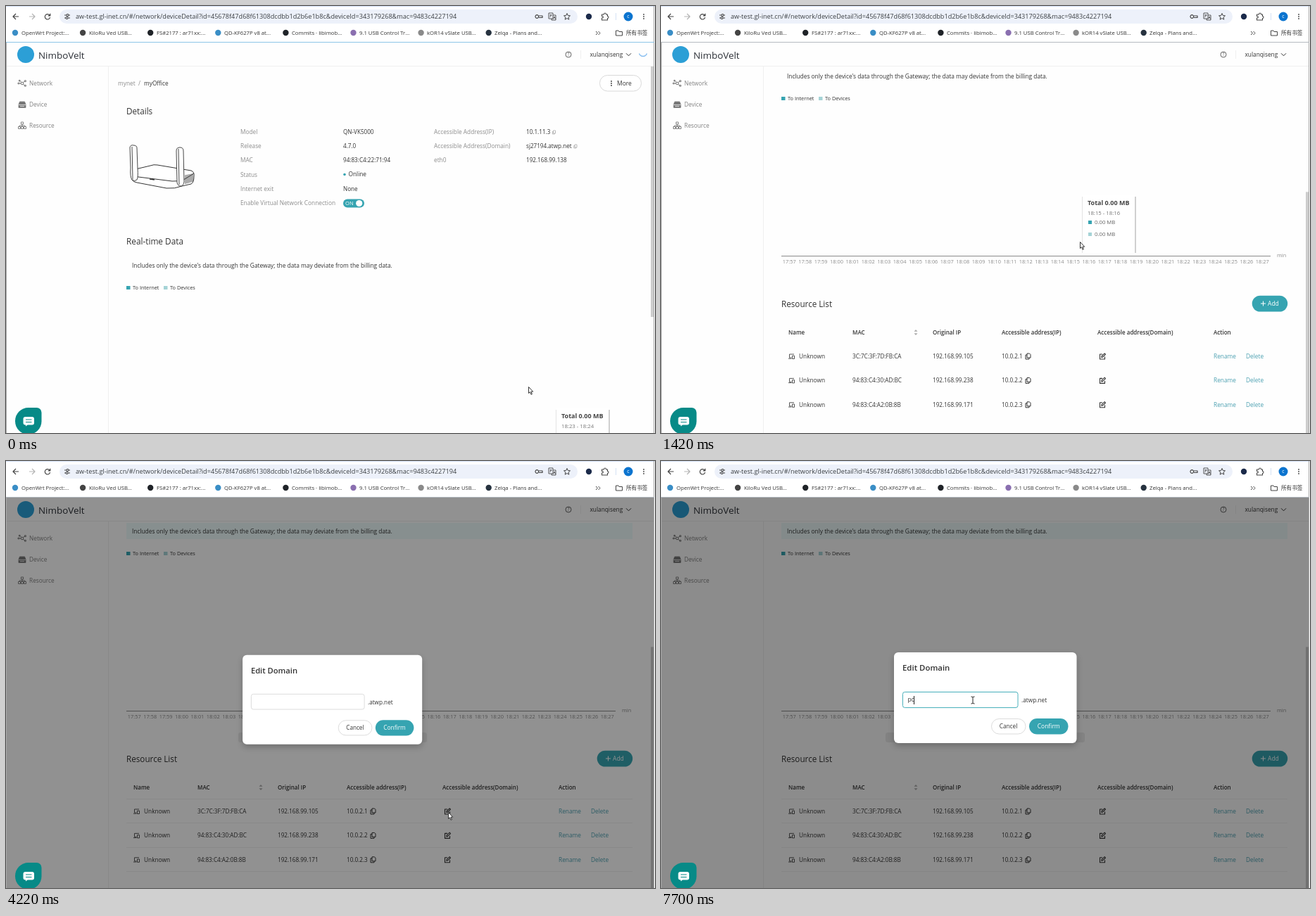
These frames come from a looping animation (922x607 px, 8000 ms). An HTML page with a canvas:

```html
<!DOCTYPE html>
<html lang="en">
<head>
<meta charset="utf-8">
<title>Device detail</title>
<style>
  html, body { margin: 0; width: 100%; height: 100%; overflow: hidden; background: #fff; }
  canvas { display: block; width: 922px; height: 607px; }
</style>
</head>
<body>
<canvas id="stage" width="922" height="607"></canvas>
<script>
const ctx = document.getElementById('stage').getContext('2d');
const LOOP = 8000;
const TEAL = '#36a4b1', INK = '#333', GREY = '#8c8c8c', FAINT = '#efefef';
const SANS = '"Open Sans", "Noto Sans", "Noto Sans CJK SC", sans-serif';

// Each entry holds from its time until the next one.
const CURSOR = [
  [0, 742, 541, 'arrow'], [150, 748, 539, 'arrow'], [280, 753, 536, 'arrow'],
  [430, 595, 335, 'arrow'], [1560, 640, 453, 'arrow'], [1720, 638, 491, 'arrow'],
  [1860, 634, 498, 'arrow'], [2010, 629, 500, 'hand'], [4070, 628, 499, 'arrow'],
  [4680, 618, 494, 'arrow'], [4960, 580, 480, 'arrow'], [5100, 510, 410, 'arrow'],
  [5230, 449, 353, 'arrow'], [5380, 443, 340, 'beam']
];
const SCROLL = [[0, 0], [580, 150], [710, 269]];
const HINT = [[0, 0], [1140, 0.5], [1290, 0.8], [1420, 1], [1560, 0.4], [1720, 0]];
const MODAL = [[0, 0, 0], [4070, 0.08, 0.705], [4220, 0.43, 0.983], [4380, 0.45, 1]];
const CARET = [[0, 0], [5660, 1], [6090, 0], [6680, 1], [7260, 0], [7540, 1]];
const TYPED = [[0, ''], [7540, 'p'], [7700, 'pc']];

const at = (list, t) => list.filter(e => e[0] <= t).pop().slice(1);

function text(s, x, y, size = 8.3, color = INK, weight = 400, align = 'left') {
  ctx.font = `${weight} ${size}px ${SANS}`;
  ctx.fillStyle = color;
  ctx.textAlign = align;
  ctx.fillText(s, x, y + size * 0.36);
}

function rect(x, y, w, h, color) {
  ctx.fillStyle = color;
  ctx.fillRect(x, y, w, h);
}

function box(x, y, w, h, r, fill, stroke) {
  ctx.beginPath();
  ctx.roundRect(x, y, w, h, r);
  if (fill) { ctx.fillStyle = fill; ctx.fill(); }
  if (stroke) { ctx.strokeStyle = stroke; ctx.lineWidth = 1; ctx.stroke(); }
}

function dot(x, y, r, color) {
  ctx.beginPath();
  ctx.arc(x, y, r, 0, Math.PI * 2);
  ctx.fillStyle = color;
  ctx.fill();
}

// An SVG path placed with its origin at x, y.
function icon(x, y, d, stroke = '#444', width = 1, fill) {
  const path = new Path2D(d);
  ctx.save();
  ctx.translate(x, y);
  ctx.lineJoin = 'round';
  if (fill) { ctx.fillStyle = fill; ctx.fill(path); }
  if (stroke) { ctx.strokeStyle = stroke; ctx.lineWidth = width; ctx.stroke(path); }
  ctx.restore();
}

function dots(x, y, color) {
  for (const dy of [-3, 0, 3]) dot(x, y + dy, 0.9, color);
}

function browser() {
  rect(0, 0, 922, 52, '#fff');
  rect(0, 0, 922, 1, '#d3e0f5');
  box(76, 5, 736, 20, 10, '#edf1fa');
  icon(14, 15, 'M4 0H-4M0-4L-4 0L0 4', '#444', 1.2);
  icon(37, 15, 'M-4 0H4M0-4L4 0L0 4', '#b5b5b5', 1.2);
  icon(59, 15, 'M3.2-1.6A3.7 3.7 0 1 0 3.6 1.2M3.8-4.2V-1.2H.8', '#444', 1.2);
  icon(87, 15, 'M-4-2H-1M2-2H4M-4 2H-2M1 2H4M-1-2a1.5 1.5 0 1 0 3 0a1.5 1.5 0 1 0-3 0M-2 2a1.5 1.5 0 1 0 3 0a1.5 1.5 0 1 0-3 0', '#444', 1.1);
  text('aw-test.gl-inet.cn/#/network/deviceDetail?id=45678f47d68f61308dcdbb1d2b6e1b8c&deviceId=343179268&mac=9483c4227194', 99, 15, 9.13, '#3c4043');
  icon(757, 15, 'M-5 0a2.3 2.3 0 1 0 4.6 0a2.3 2.3 0 1 0-4.6 0M0-1H5V1.5H0', '#444', 1.2);
  icon(776, 15, 'M-5-5H1V3H-5ZM1-2H5V5H-1V3M-3.5-2H-.5M-2-3V-2Q-2 0-3.5 1M1.5 3.5L3 0L4.5 3.5', '#444', 0.9);
  icon(797, 15, 'M0-4.5L1.3-1.5L4.5-1.2L2.1 1L2.8 4.2L0 2.5L-2.8 4.2L-2.1 1L-4.5-1.2L-1.3-1.5Z');
  dot(828, 15, 4.2, '#1b2a4a');
  icon(851, 15, 'M-4.5-3H-1.5Q-1.5-5 0-5T1.5-3H3.5V-.5Q5-.5 5 1T3.5 2.5V5H-4.5V2Q-2.5 2-2.5 .8T-4.5-.5Z', '#444', 1.1);
  rect(866, 10, 1, 10, '#d5e2f5');
  dot(884, 15, 6.5, '#0b74cf');
  text('c', 884, 14.5, 7, '#fff', 400, 'center');
  dots(906, 15, '#444');

  const marks = [
    ['OpenWrt Project:...', '#3a8ec6'], ['KiloRu Ved USB...', '#444'],
    ['FS#2177 : ar71xx:...', '#1f2328'], ['QD-KF627P v8 at...', '#3a8ec6'],
    ['Commits · libimob...', '#1f2328'], ['9.1 USB Control Tr...', '#8a6fb0'],
    ['kOR14 vSlate USB...', '#8a8a8a'], ['Zelqa - Plans and...', '#26323f']
  ];
  marks.forEach(([label, color], i) => {
    dot(13 + i * 96.1, 38, 4.2, color);
    text(label, 22 + i * 96, 38.5, 7.7);
  });
  icon(841, 38.5, 'M-3-2.5L-.5 0L-3 2.5M.5-2.5L3 0L.5 2.5');
  icon(871, 38.5, 'M-4.5-3.5H-1L0-2H4.5V3.5H-4.5Z', '#444', 1);
  text('所有书签', 881, 38.5, 7.6);
}

function frame(loading) {
  dot(28, 69, 12, '#2c9fd6');
  text('NimboVelt', 46, 70, 13.4, '#2b2f36');
  icon(799, 69, 'M-4 0a4 4 0 1 0 8 0a4 4 0 1 0-8 0', '#555', 0.9);
  text('?', 799, 69, 6.3, '#555', 400, 'center');
  rect(816, 63, 1, 12, '#f0f0f0');
  text('xulanqiseng', 829.5, 69, 8.3);
  icon(884.5, 69, 'M-3.5-1.7L0 1.8L3.5-1.7', INK);
  if (loading) icon(905, 66.5, 'M-5.5 1Q-4 5 0 5T5.5 1', '#86bdf0', 1.3);
  rect(0, 85, 920, 1, FAINT);
  rect(145, 86, 1, 521, FAINT);

  icon(23, 110, 'M-1.8 0a1.8 1.8 0 1 0 3.6 0a1.8 1.8 0 1 0-3.6 0M-1.8 0H-4M-1-1.5L-3-3.5M1.3-1.3L3.5-3M1.3 1.3L3.5 3M-1-1.5M-6-.8h1.8v1.6h-1.8zM-4.6-4.6h1.6v1.6h-1.6zM3.5-4.2h1.8v1.8h-1.8zM3.5 2.4h1.8v1.8h-1.8z', '#777', 1);
  icon(23, 140, 'M-5 0L-3.5-4H3.5L5 0V4.5H-5Z', '#777', 0.8, '#777');
  icon(23, 140, 'M-5 .5H5M-3 2.5H3', '#fff', 0.7);
  icon(23, 170, 'M-1.6-5h3.2v3h-3.2zM-5.5 1.5h3v3h-3zM-1.5 1.5h3v3h-3zM2.5 1.5h3v3h-3zM0-2V1.5M-4 1.5V0H4V1.5', '#777', 0.9);
  ['Network', 'Device', 'Resource'].forEach((s, i) => text(s, 33, 110 + i * 30, 8.3, '#808080'));
}

function router() {
  icon(0, 0, 'M180 235Q178 238 179 247Q180 250 186 251L228 259Q240 260 250 256L263 253Q267 251 267 242Q268 236 263 234L215 226Q210 225 205 227L184 232Q180 233 180 238Q181 242 188 243L236 249Q246 250 254 246L267 238', '#333', 1, '#fff');
  icon(0, 0, 'M176 201Q177 197 181 198Q186 198 186 202L187 231Q188 243 186 247Q183 250 179 247Q176 243 177 230ZM179 200L180 246M242 206Q242 201 247 201Q252 201 252 206L253 250Q252 256 248 256Q244 256 243 251ZM245 203L246 254', '#333', 0.9, '#fff');
  icon(0, 0, 'M204 246L211 247', '#333', 1.4);
  for (let x = 255; x < 267; x += 2) icon(x, 238, `M0 ${(266 - x) * 0.2}V${15 - (x - 255) * 0.3}`, '#444', 0.9);
}

const copyIcon = (x, y) => icon(x, y, 'M-1.5-4H2L3.5-2.5V2H-1.5ZM-1.5-2H-3.5V4H1.5V2', INK, 1);
const smallCopyIcon = (x, y) => icon(x, y, 'M-1-2.5H2V1.5H-1ZM-1-1H-2.2V2.5H1V1.5', '#aaa', 0.8);

function hint(x, y, span, alpha) {
  ctx.save();
  ctx.globalAlpha = alpha;
  rect(x, y, 77, 82, '#fff');
  rect(x, y + 2, 1, 80, '#e3e3e3');
  rect(x + 75, y + 2, 2, 80, '#d0d0d0');
  text('Total 0.00 MB', x + 8, y + 11, 9, '#444', 700);
  text(span, x + 8, y + 25, 7.75, '#777');
  [TEAL, '#a5d3d6'].forEach((color, i) => {
    rect(x + 9, y + 36 + i * 17, 5, 5, color);
    text('0.00 MB', x + 18, y + 38.5 + i * 17, 7.75, '#666');
  });
  ctx.restore();
}

function details() {
  text('mynet', 159, 110, 8.3, GREY);
  text('/', 188, 110, 8.3, GREY);
  text('myOffice', 196, 110, 8.3);
  box(843.5, 98.5, 59, 22.5, 11, '#fff', '#d9d9d9');
  dots(860, 110, INK);
  text('More', 868, 110, 8.5);
  text('Details', 171, 150, 11.7);
  router();
  const left = [['Model', 'QN-VK5000'], ['Release', '4.7.0'], ['MAC', '94:83:C4:22:71:94'],
    ['Status', ''], ['Internet exit', 'None'], ['Enable Virtual Network Connection', '']];
  const right = [['Accessible Address(IP)', '10.1.11.3'],
    ['Accessible Address(Domain)', 'sj27194.atwp.net'], ['eth0', '192.168.99.138']];
  [[left, 333, 479], [right, 608, 739]].forEach(([rows, x, valueX]) =>
    rows.forEach(([name, value], i) => {
      text(name, x, 179 + i * 20.2, 8.3, GREY);
      text(value, valueX, 179 + i * 20.2, 8.15);
    }));
  smallCopyIcon(778.5, 179.5);
  smallCopyIcon(809, 199.5);
  dot(481, 239.5, 1.8, TEAL);
  text('Online', 486.5, 239.5);
  box(479, 274.5, 30, 12, 6, TEAL);
  text('ON', 482, 280.7, 7.6, '#fff');
  dot(501.7, 280.5, 4.6, '#fff');
}

function chart(crisp) {
  text('Real-time Data', 171, 335, 11.8);
  if (crisp) rect(171, 357, 719, 23, '#edfbfb');
  text("Includes only the device's data through the Gateway; the data may deviate from the billing data.", 179, 369, 8.33);
  rect(171, 398, 5.5, 5, TEAL);
  text('To Internet', 180, 400, 7.35);
  rect(224, 398, 5.5, 5, '#a5d3d6');
  text('To Devices', 233, 400, 7.35);
  rect(171, 624, 695, 1, '#8a8a8a');
  for (let i = 0; i <= 30; i++) {
    const min = 17 * 60 + 57 + i;
    const label = `${Math.floor(min / 60)}:${String(min % 60).padStart(2, '0')}`;
    text(label, 182.3 + i * 22.4, 632, 7.4, GREY, 400, 'center');
  }
  text('min', 875, 623, 7.3, GREY);
}

function resources(crisp, hover) {
  text('Resource List', 171, 693, 11.7);
  box(839.7, 680.7, 50.5, 22.8, 11.4, TEAL);
  icon(855.5, 692, 'M-3.5 0H3.5M0-3.5V3.5', '#fff', 1);
  text('Add', 862, 692, 8.5, '#fff');
  [['Name', 181], ['MAC', 272], ['Original IP', 386], ['Accessible address(IP)', 484],
    ['Accessible address(Domain)', 620], ['Action', 785]]
    .forEach(([s, x]) => text(s, x, 733, 8, INK, 600));
  icon(362, 733, 'M-2.5-1.2L0-4L2.5-1.2ZM-2.5 1.2L0 4L2.5 1.2Z', null, 0, '#aaa');
  if (hover) rect(190, 750, 700, 33, '#fafafa');
  if (crisp) for (let i = 0; i < 4; i++) rect(171, 749 + Math.round(i * 34.3), 719, 1, '#f1f1f1');
  [['3C:7C:3F:7D:FB:CA', 105], ['94:83:C4:30:AD:BC', 238], ['94:83:C4:A2:0B:8B', 171]]
    .forEach(([mac, host], i) => {
      const y = 767 + i * 34.4;
      icon(185.5, y, 'M3.5-3H-3V2H0M-4.5 3.2H0M1-.8H4V3.5H1Z', '#444', 0.9);
      text('Unknown', 196, y);
      text(mac, 272, y, 8.15);
      text(`192.168.99.${host}`, 386, y, 8.15);
      text(`10.0.2.${i + 1}`, 484, y, 8.15);
      copyIcon(521.5, y);
      icon(627, y, 'M0-3H-3.5V4H3.5V.5M-1.2 1.5L-.8-.5L3.2-4.2L4.5-2.8L.6 1Z', INK, 1.1);
      text('Rename', 785, y, 8.3, '#4a9fb0');
      text('Delete', 831, y, 8.3, '#4a9fb0');
    });
}

function page(t) {
  const [scroll] = at(SCROLL, t);
  const crisp = t >= 4070;
  ctx.save();
  ctx.beginPath();
  ctx.rect(146, 86, 774, 521);
  ctx.clip();
  ctx.save();
  ctx.translate(0, -scroll);
  details();
  chart(crisp);
  resources(crisp, t >= 1720 && !crisp);
  ctx.restore();
  if (t < 150) hint(781, 572, '18:23 - 18:24', 1);
  const [alpha] = at(HINT, t);
  if (alpha) hint(598, 269, '18:15 - 18:16', alpha);
  rect(916, 86 + scroll * 0.663, 4, 356, '#cdcdcd');
  ctx.restore();
}

function modal(t) {
  const [mask, scale] = at(MODAL, t);
  if (!scale) return;
  const opening = scale < 0.9, focus = t >= 5380;
  rect(0, 51, 921, 556, `rgba(0,0,0,${mask})`);
  if (opening) {
    rect(418, 386, 1, 12, '#cfcfcf');
    rect(602, 386, 1, 12, '#cfcfcf');
  } else {
    box(scale < 1 ? 330 : 319, 386, scale < 1 ? 268 : 283, 14, 3, 'rgba(0,0,0,.07)');
  }
  ctx.save();
  // The dialog grows out of the clicked point.
  ctx.translate(631, 499);
  ctx.scale(scale, scale);
  ctx.translate(-631, -499);
  ctx.shadowColor = opening ? 'rgba(0,0,0,.08)' : 'rgba(0,0,0,.22)';
  ctx.shadowBlur = opening ? 3 : 9;
  ctx.shadowOffsetY = opening ? 1 : 4;
  box(331, 272, 259.5, 129, 6, opening ? 'rgba(236,236,236,.88)' : '#fff');
  ctx.shadowColor = 'transparent';
  text('Edit Domain', 343, 294, 11.4, INK, opening ? 400 : 600);
  if (opening) ctx.globalAlpha = 0.65;
  if (t >= 5660) box(342.5, 327.5, 165, 24, 4, '#d7edef');
  if (!opening) box(343.5, 328.5, 163.5, 22, 3, '#fff', focus ? '#55b5c0' : '#dcdcdc');
  text('.atwp.net', 512, 340);
  if (!opening) box(469.5, 366.5, 48.5, 21.5, 11, '#fff', '#dcdcdc');
  text('Cancel', 493.5, 377, 8.3, INK, 400, 'center');
  box(523, 366, 55.5, 22.5, 11.2, TEAL);
  text('Confirm', 550.7, 377, 8.5, '#fff', 400, 'center');
  ctx.restore();

  const [typed] = at(TYPED, t);
  text(typed, 350.5, 339.5, 8.3);
  const end = typed ? Math.round(350 + ctx.measureText(typed).width) : 350;
  if (at(CARET, t)[0]) rect(end, 334, 1, 12, '#222');
}

function chat() {
  box(13, 571, 37.5, 38, [19, 7, 19, 19], '#078a87');
  box(24.5, 584, 15.5, 11.5, 3, '#fff');
  icon(0, 0, 'M28 595V597.5L31 595Z', null, 0, '#fff');
  icon(0, 0, 'M28 588H36.5M28 591.5H36.5', '#078a87', 1);
}

function pointer(t) {
  const [x, y, kind] = at(CURSOR, t);
  if (kind === 'arrow') {
    icon(x, y, 'M.5 .5V9.5L2.5 7.7L4 11.3L5.4 10.7L4 7.2H6.7Z', '#222', 0.9, '#fff');
  } else if (kind === 'hand') {
    icon(x, y, 'M-1.5 8V1.2Q-1.5 .2-.5 .2T.6 1.2V5L4 5.7Q5.3 6 5.2 7.5L4.7 11V13.5H-1V12L-4.3 8.3Q-4.7 7-3.4 7Z', '#222', 0.9, '#fff');
    icon(x, y, 'M1.9 5.5V7.5M3.5 6V8', '#222', 0.7);
  } else {
    icon(x, y, 'M-2.5-5Q0-5 0-4Q0-5 2.5-5M0-4V4M-2.5 5Q0 5 0 4Q0 5 2.5 5', '#222', 1);
  }
}

function border(loading) {
  rect(0, 51, 1, 556, '#a9a9a9');
  rect(920, 0, 1, 607, '#a9a9a9');
  rect(0, 51, 921, 1, loading ? '#8cc5e8' : '#b4bac0');
}

function draw(now) {
  const t = now % LOOP;
  const loading = t < 150;
  rect(0, 0, 922, 607, '#fefefe');
  browser();
  frame(loading);
  page(t);
  modal(t);
  border(loading);
  chat();
  pointer(t);
  requestAnimationFrame(draw);
}
requestAnimationFrame(draw);
</script>
</body>
</html>
```
